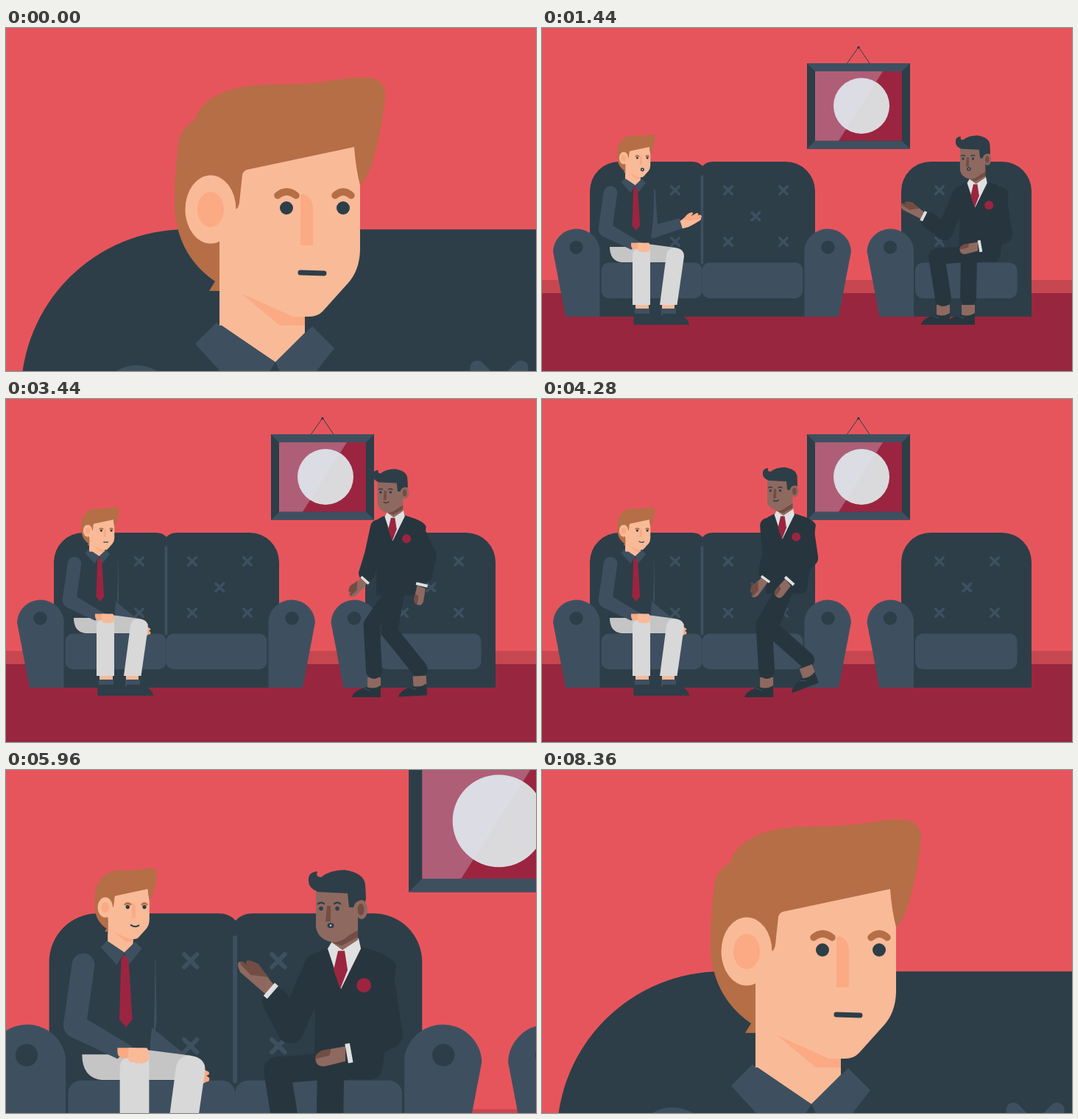
An HTML page for the animation above (9.2 s loop, 720x467 px).

```html
<!DOCTYPE html>
<html>
<head>
<meta charset="utf-8">
<style>
html, body { margin: 0; width: 100%; height: 100%; overflow: hidden; background: #e7555c; }
svg { display: block; width: 100%; height: 100%; }
.wall { fill: #e7555c } .floor { fill: #98263f } .red { fill: #9b2540 }
.dark { fill: #2d3e48 } .blue { fill: #3e5060 }
.skin { fill: #f9ba98 } .blush { fill: #fbaa84 } .hair { fill: #b56e46 }
.pale { fill: #d8d8d8 } .grey { fill: #c5c5c5 } .white { fill: #e0e0e0 }
.suit { fill: #27363e } .brown { fill: #8e6960 } .umber { fill: #724d44 }
.line { fill: none; stroke-linecap: round; stroke-linejoin: round; }
.limb { stroke: #27363e; stroke-width: 22 }
</style>
</head>
<body>
<svg viewBox="0 0 720 467" preserveAspectRatio="none">
<defs>
  <g id="cross"><path class="line" stroke="#3e5060" stroke-width="3.6" d="M-5.3-5.3L5.3 5.3M5.3-5.3L-5.3 5.3"/></g>
  <g id="rest">
    <path class="blue" d="M32 393L15 304A32 32 0 0 1 78.5 300V393Z"/>
    <circle class="dark" cx="46.5" cy="298.6" r="9.2"/>
  </g>
  <g id="shoe">
    <path class="brown" d="M-9-3H9V12H-9Z"/>
    <path class="suit" d="M9 8V24H-30Q-28 15-10 10Q0 14 9 8Z"/>
    <path class="line" stroke="#3e5060" d="M-14 12L-6 15"/>
  </g>
</defs>
<g id="cam">
  <path class="wall" d="M0 0H720V467H0Z"/>
  <path fill="#c64750" d="M0 343H720V361H0Z"/>
  <path class="floor" d="M0 361H720V467H0Z"/>

  <path class="line" stroke="#2d3e48" d="M414.5 48L430 26L445 48"/>
  <circle class="dark" cx="430" cy="26.5" r="1.8"/>
  <path class="dark" d="M360 48H500V164.5H360Z"/>
  <path class="blue" d="M360 48H500L489 59H371ZM360 164.5H500L489 153.5H371Z"/>
  <path class="red" d="M371 59H489V153.5H371Z"/>
  <circle cx="434" cy="106" r="38" fill="#dadadc"/>
  <path fill="#dfe2f4" opacity=".3" d="M371 59H463L403 153.5H371Z"/>

  <path class="dark" d="M65 393V222A40 40 0 0 1 105 182H204Q213 182 218 188Q223 182 232 182H331A40 40 0 0 1 371 222V393Z"/>
  <path class="line" stroke="#3e5060" stroke-width="3.6" d="M217.5 202V320"/>
  <path class="dark" d="M488 393V222A40 40 0 0 1 528 182H625A40 40 0 0 1 665 222V393Z"/>
  <g id="crosses"></g>
  <rect class="blue" x="80.5" y="319.5" width="137" height="48.5" rx="10.5"/>
  <rect class="blue" x="217.5" y="319.5" width="137" height="48.5" rx="10.5"/>
  <rect class="blue" x="507" y="319.5" width="138.5" height="48.5" rx="10.5"/>
  <use href="#rest"/>
  <use href="#rest" transform="matrix(-1 0 0 1 435 0)"/>
  <use href="#rest" x="426.5"/>
  <use href="#rest" transform="matrix(-1 0 0 1 1152.6 0)"/>

  <!-- host on the left -->
  <g transform="translate(36.5 79.2) scale(.5092)">
    <path id="sleeve" class="blue" d="M226 276Q231 272 231 285L237 375L219 409Q228 340 226 276Z"/>
    <g id="forearm">
      <path class="blue" d="M209 376L298 364L303 391L219 409Z"/>
      <path class="skin" d="M298 371L318 360L350 366Q357 369 353 375Q340 382 318 390L302 392Z"/>
      <path class="blush" d="M304 369L318 357Q330 350 334 353Q336 356 328 362L345 355Q351 356 347 362L353 361Q359 364 355 369L351 373L325 373Z"/>
    </g>
    <path class="dark" d="M150 255H210L226 275Q228 340 219 409V432H108L112 270Z"/>
  </g>
  <path class="grey" d="M92 298H123L147 294.5L181 299V319H108Q92 317 92 298Z"/>
  <path class="skin" d="M127 375H145V384H127ZM163 375H180V384H163Z"/>
  <path class="blue" d="M126 382H146V392H126ZM162 382H182V392H162Z"/>
  <path class="dark" d="M124.5 389H146L164 392V389H183Q198 393 200 404H124.5Z"/>
  <path class="pale" d="M123 377V310Q123 300 132 300H147V377ZM160 377L169 309Q171 299 180 299Q193 300 193 311L183.500 377Z"/>
  <g transform="translate(36.5 79.2) scale(.5092)">
    <path class="blue" d="M93 282A18 18 0 0 1 129 288L117 373L190 417L166 437L92 402Q78 395 79 380Z"/>
    <path class="blush" d="M166 419H195V436H174Q166 434 166 425Z"/>
    <path class="skin" d="M184 419H213Q217 422 217 434Q216 443 209 443Q204 446 200 443Q196 446 192 442Q184 444 183 435Z"/>
    <path class="red" d="M174 270H181L184 278L190 373L180 386L169 373L172 278Z"/>
  </g>
  <g transform="scale(.17857) translate(343.6 745)">
    <path class="skin" d="M290 370H406V415L366 455L290 403Z"/>
    <path class="blue" d="M286 401L257 430L331 511L366 455ZM416 406L446 436L390 508L366 455Z"/>
    <g id="head">
      <path class="skin" d="M290 230L320 180L473 150L481 210V303Q480 330 465 347L430 386Q423 393 412 393H406V405H290Z"/>
      <path class="blush" d="M319 361L372 405H406V393H390Z"/>
      <path class="hair" d="M256 126C265 95 300 80 350 77C390 77 420 76 440 72Q475 66 495 68Q516 71 515 95Q510 140 500 175Q492 205 481 214Q475 190 473 162L327 193Q322 195 321 200L317 238Q316 245 312 247L290 293V358H276L284 345Q233 310 229 245Q228 200 235 152Q239 135 256 126Z"/>
      <ellipse class="skin" cx="278" cy="247" rx="34.500" ry="46.500"/>
      <path class="skin" d="M290 270H312V300H290Z"/>
      <ellipse class="blush" cx="278" cy="247" rx="18" ry="24"/>
      <path class="blush" d="M400 296V230Q400 226 404 226Q417 231 417 246V296Z"/>
      <path id="brows" class="line" stroke="#b56e46" stroke-width="9.500" d="M369 228Q381 218 394 228M447 228Q458 218 469 228"/>
      <ellipse id="eyeL" class="dark" cy="245" rx="9"/>
      <ellipse id="eyeR" class="dark" cy="245" rx="9"/>
      <path id="lips" class="line" stroke="#2d3e48" stroke-width="7"/>
      <g id="oh"><circle class="dark" r="14"/><circle class="white" r="5"/></g>
    </g>
  </g>

  <!-- guest on the right -->
  <path id="legB" class="line limb"/>
  <use id="footB" href="#shoe"/>
  <use id="footA" href="#shoe"/>
  <path id="legA" class="line limb"/>
  <g id="bust">
    <g transform="translate(284 0) scale(.6046) translate(48.5 106)">
      <path class="suit" d="M440 240Q413 250 412 264L420 335L418 421H495Q512 420 512 400L530 266Q526 252 480 240Z"/>
      <path class="white" d="M443 233L479 229L482 243L455 298L437 243Z"/>
      <path class="red" d="M451 246H460L464 272L454 298L445 272Z"/>
      <path class="brown" d="M421 162H478V231L457 245L442 234Q424 230 421 214Z"/>
      <path class="umber" d="M443 235Q456 234 467 224L478 218V227L456 239Z"/>
      <path class="dark" d="M411 151Q410 139 423 138Q420 146 428 146Q440 136 460 136Q486 140 488 156L489 175Q488 183 482 178Q474 178 472 187H466L464 168L424 166Q411 161 411 151Z"/>
      <ellipse class="brown" cx="483" cy="190" rx="8" ry="13"/>
      <ellipse class="umber" cx="482" cy="190" rx="4.500" ry="8"/>
      <path class="umber" d="M436 185H441V206H434Z"/>
      <path class="line" stroke="#2d3e48" stroke-width="2.4" d="M424 182Q428 179 432 182M446 182Q450 179 454 182"/>
      <ellipse id="eyeC" class="dark" cx="428" cy="188.500" rx="2.8"/>
      <ellipse id="eyeD" class="dark" cx="450" cy="188.500" rx="2.8"/>
      <path id="grin" class="line" stroke="#2d3e48" stroke-width="2.4" d="M435 211Q441 214 446 210"/>
      <g id="say"><ellipse class="dark" rx="4.500" ry="4"/><circle class="white" r="1.300"/></g>
    </g>
    <path id="arm1" class="line limb"/>
    <g id="hand1">
      <path class="brown" d="M-2-5L5-6L13-8L25-2L33-2Q36 0 32 3L28 5H-2Z"/>
      <path class="umber" d="M8-7L13-8L21-10Q29-8 30-6Q31-3 26-3L32-3Q35-2 32 0L20 1Z"/>
      <path class="white" d="M-3-7H1V7H-3Z"/>
    </g>
    <path id="arm2" class="line limb"/>
    <circle class="red" cx="607.2" cy="241.2" r="6"/>
    <g id="hand2">
      <path class="brown" d="M2-6H20Q28-5 28 2Q27 8 19 7L4 6Z"/>
      <path class="umber" d="M14-6L20-6Q28-5 28 0L16-1Z"/>
      <path class="white" d="M-2-8H2V8H-2Z"/>
    </g>
  </g>
</g>
</svg>
<script>
const LOOP = 9200;
const $ = id => document.getElementById(id);
const set = (id, attrs) => { for (const k in attrs) $(id).setAttribute(k, attrs[k]); };
const move = (id, transform) => set(id, { transform });
const lerp = (a, b, u) => a + (b - a) * u;
const mix = (p, q, u) => p.map((v, i) => lerp(v, q[i], u));
const ramp = (t, a, b) => {
  const u = Math.min(1, Math.max(0, (t - a) / (b - a)));
  return u * u * (3 - 2 * u);
};
const pulse = (t, a, b, c, d) => ramp(t, a, b) - ramp(t, c, d);
const blink = (t, ...times) => 1 - .8 * Math.max(0, ...times.map(c => 1 - Math.abs(t - c) / 120));
const poly = (...pts) => 'M' + pts.map(p => p.join(' ')).join('L');

const quincunx = (x, list) => list.map(([dx, y]) => `<use href="#cross" x="${x + dx}" y="${y}"/>`).join('');
const five = [[0, 221], [75, 221], [37.3, 256.5], [0, 291], [75, 291]];
$('crosses').innerHTML = quincunx(181, [[0, 221], [0, 291]]) + quincunx(253, five) + quincunx(540, five);

function kneeOf(hip, foot) {
  const dx = foot[0] - hip[0], dy = foot[1] - hip[1];
  const full = Math.hypot(dx, dy), d = Math.min(full, 137);
  const along = (63 * 63 - 75 * 75 + d * d) / (2 * d);
  const out = Math.sqrt(Math.max(0, 63 * 63 - along * along));
  const ux = dx / full, uy = dy / full;
  return [hip[0] + ux * along - uy * out, hip[1] + uy * along + ux * out];
}

function host(t) {
  const down = ramp(t, 1980, 2480);
  const drop = 1 - ramp(t, 0, 500) + down;
  const wave = pulse(t, 900, 1100, 1900, 2000) * (-4 + 4 * Math.cos((t - 1440) / 130 + 2.4));
  move('forearm', `rotate(${47 * drop + wave} 209 376) translate(209 376) scale(${1 - .04 * drop}) translate(-209 -376)`);
  const thin = 1 - .7 * drop;
  move('sleeve', `translate(${226 * (1 - thin)} 0) scale(${thin} 1)`);

  move('head', `translate(0 ${13 * pulse(t, 1960, 2500, 4840, 5600)})`);
  move('brows', `translate(0 ${5 * pulse(t, 960, 1200, 6760, 7200)})`);
  const gaze = -10 * pulse(t, 6760, 7200, 7920, 8360);
  const ry = 9 * blink(t, 625, 2240, 3900, 5300);
  set('eyeL', { cx: 381 + gaze, ry });
  set('eyeR', { cx: 458 + gaze, ry });

  const smile = pulse(t, 3600, 4100, 7920, 8360);
  const talk = pulse(t, 860, 960, 1900, 2000) * (.55 + .45 * Math.cos((t - 1440) / 60));
  set('lips', {
    d: `M${400 - 4 * smile} ${333 - 5 * smile}Q416 ${333.5 + 8 * smile} 432 ${334 - 4 * smile}`,
    opacity: talk > .25 ? 0 : 1
  });
  set('oh', { transform: `translate(420 335) scale(1 ${talk})`, opacity: talk > .25 ? 1 : 0 });
}

function leg(name, hip, ankle, seatKnee, stand, tilt) {
  const knee = mix(seatKnee, kneeOf(hip, ankle), stand);
  set('leg' + name, { d: poly(hip, knee, [ankle[0], ankle[1] - 12]) });
  move('foot' + name, `translate(${ankle}) rotate(${tilt})`);
}

function guest(t) {
  const stand = pulse(t, 2700, 3240, 4850, 5450);
  const x = -290 * ramp(t, 2940, 4600) + 6 * ramp(t, 4900, 5400);
  const walk = pulse(t, 2920, 3220, 4560, 4850);
  const phase = Math.PI * (x + 62) / 48;
  const swing = Math.cos(phase), lift = Math.sin(phase);
  const y = -51 * stand - 10 * walk * lift * lift;
  const hip = [599 + x - 4 * stand, 306 + y];
  const moved = t > 4000;
  const seat = moved ? -284 : 0;

  for (const [name, side, ax, kx] of [['B', 1, 579, 580], ['A', -1, 545, 536]]) {
    const up = Math.max(0, -side * lift) * walk;
    const step = [594 + x + side * 31 * swing, 382 - 30 * up];
    const ankle = mix([ax + seat, 380], step, walk);
    leg(name, hip, ankle, [kx + seat, 311], stand, -45 * up * (.5 + side * swing / 2));
  }

  move('bust', `translate(${x} ${y})`);
  const late = ramp(t, 3440, 4280);
  const elbow1 = mix([547, 278], [lerp(561, 572, late), 263], stand);
  const talking = pulse(t, 960, 1100, 2300, 2500);
  const gesture = moved ? -117 : -143 + 8 * talking * Math.sin((t - 1440) / 150);
  const angle = lerp(gesture, lerp(-253, -259, late), stand);
  const rad = angle * Math.PI / 180;
  const wrist1 = [elbow1[0] + 37 * Math.cos(rad), elbow1[1] + 37 * Math.sin(rad)];
  set('arm1', { d: poly([569, 226], elbow1, mix(elbow1, wrist1, .72)), 'stroke-width': 18 });
  const turn = angle + lerp(moved ? -22 : -10, 25, stand);
  move('hand1', `translate(${wrist1}) rotate(${turn}) scale(${lerp(1, .85, stand)} -1)`);

  const elbow2 = mix([628, 282], mix([637, 265], [626, 270], late), stand);
  const wrist2 = mix([595, 297], mix([628, 304], [598, 301], late), stand);
  const bend = Math.atan2(wrist2[1] - elbow2[1], wrist2[0] - elbow2[0]) * 180 / Math.PI;
  set('arm2', { d: poly([620, 228], elbow2, mix(elbow2, wrist2, .66)), 'stroke-width': 19 });
  move('hand2', `translate(${wrist2}) rotate(${lerp(170, bend, stand)}) scale(1 -1)`);

  const ry = 2.9 * blink(t, 1900, 3100, 4600);
  set('eyeC', { ry });
  set('eyeD', { ry });
  const speech = talking * (.6 + .4 * Math.cos((t - 1440) / 70))
    + pulse(t, 5450, 5600, 6400, 6560) * (.55 + .3 * Math.cos((t - 5960) / 70));
  const open = speech > .25;
  set('grin', { opacity: open ? 0 : 1 });
  set('say', { transform: `translate(441 211.5) scale(1 ${speech})`, opacity: open ? 1 : 0 });
}

function draw(now) {
  const t = now % LOOP;
  const zoom = 1 - ramp(t, 0, 964) + ramp(t, 5773, 6560);
  move('cam', `translate(${-343.6 * zoom} ${-745 * zoom}) scale(${1 + 4.6 * zoom})`);
  host(t);
  guest(t);
}

let start;
function tick(now) {
  start ??= now;
  draw(now - start);
  requestAnimationFrame(tick);
}
draw(0);
requestAnimationFrame(tick);
</script>
</body>
</html>
```
